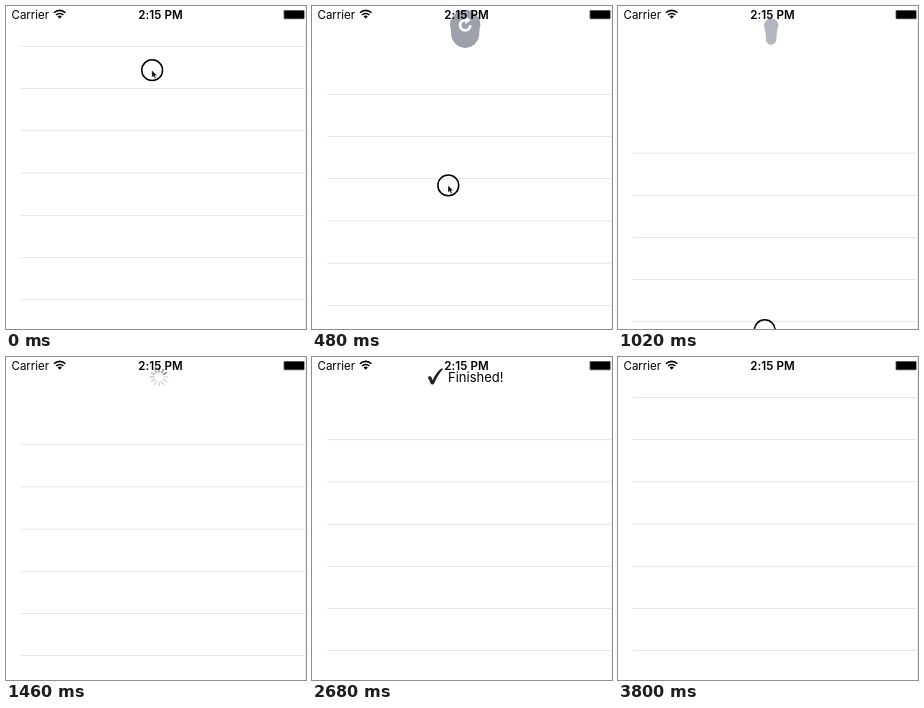
These frames come from a looping animation (300x323 px, 4140 ms). An HTML page:

```html
<!DOCTYPE html>
<html lang="en">
<head>
<meta charset="utf-8">
<title>Pull to refresh</title>
<style>
  html, body { margin: 0; width: 100%; height: 100%; overflow: hidden; background: #fff; }
  svg { display: block; width: 300px; height: 323px; }
  text { font-family: Inter, Roboto, sans-serif; }
</style>
</head>
<body>
<svg viewBox="0 0 300 323">
  <rect width="300" height="323" fill="#fff"/>
  <rect x="299" width="1" height="323" fill="#efefef"/>
  <g id="rows" fill="#c8c7cc"></g>
  <g id="spinner" stroke="#7c7c7c" stroke-width="1.6" stroke-linecap="round"></g>
  <g id="done">
    <path fill="#222" d="M115.7 20.6C117 18.7 119 18.8 119.6 20.6L120.6 23.3C122.6 18.6 125.6 14.3 128.6 12C129.8 11.3 131.2 11.6 130.9 12.3C127.3 16.2 124.4 21 122.4 26C121.7 27.8 119.4 28 118.6 26.4C117.7 24.4 117 22.3 115.7 20.6Z"/>
    <text x="136" y="24.6" font-size="13">Finished!</text>
  </g>
  <g id="drop">
    <path id="body" fill="#9ba2ac" stroke="#808791" stroke-width=".6"/>
    <path id="arrow" fill="#fff"/>
  </g>
  <g id="status">
    <text x="5.5" y="13.2" font-size="11.5">Carrier</text>
    <text x="154.5" y="13.2" font-size="11.6" font-weight="600" letter-spacing=".1" text-anchor="middle">2:15 PM</text>
    <g fill="none" stroke="#000" stroke-width="1.6">
      <path d="M48 6.8A8 8 0 0 1 59.4 6.8"/>
      <path d="M50.1 9A5 5 0 0 1 57.3 9"/>
    </g>
    <path d="M51.6 10.6A3 3 0 0 1 55.8 10.6L53.7 12.7Z"/>
    <rect x="277.5" y="4" width="21.2" height="9.2" rx="1.2" fill="#777"/>
    <rect x="278.3" y="4.8" width="19.7" height="7.7" rx=".6"/>
  </g>
  <g id="cursor">
    <circle r="10.4" fill="none" stroke="#000" stroke-width="1.5"/>
    <path d="M-.3 0V7.2L1.4 5.7L2.6 8.3L3.9 7.7L2.7 5.2H4.9Z" stroke="#fff" stroke-width=".4"/>
  </g>
</svg>
<script>
const LOOP = 4140, TRIGGER = 864, RELEASE = 1100, DONE = 2680, CLOSE = 3360, CLOSED = 3780;
const PT = 0.958, MID = 153.2, TOP = -1, OPEN = 42.35, ROW = 42.18, FIRST = 40.25;
const $ = id => document.getElementById(id);
const lerp = (a, b, p) => a + (b - a) * p;
const clamp = v => Math.min(1, Math.max(0, v));
const show = (el, on) => el.setAttribute('visibility', on ? 'visible' : 'hidden');
const move = (el, x, y, extra = '') => el.setAttribute('transform', `translate(${x} ${y})${extra}`);

function add(parent, name, attrs) {
  const el = document.createElementNS('http://www.w3.org/2000/svg', name);
  for (const key in attrs) el.setAttribute(key, attrs[key]);
  parent.append(el);
  return el;
}

for (let i = 0; i < 7; i++)
  add($('rows'), 'rect', { x: 15, y: FIRST + i * ROW, width: 284, height: 0.45 });

const spokes = Array.from({ length: 12 }, (_, i) =>
  add($('spinner'), 'line', { y1: -5, y2: -8.8, transform: `rotate(${i * 30})` }));

// time, x, y of the finger
const drag = [[0, 146.2, 64], [280, 136.7, 122.5], [660, 138.2, 231.5], [1020, 146.7, 324], [1100, 147.7, 341]];

function finger(t, axis) {
  const last = drag.length - 1;
  let i = 0;
  while (i < last - 1 && t > drag[i + 1][0]) i++;
  const slope = n => {
    const a = drag[Math.max(0, n - 1)], b = drag[Math.min(last, n + 1)];
    return (b[axis] - a[axis]) / (b[0] - a[0]);
  };
  const a = drag[i], b = drag[i + 1], span = b[0] - a[0], p = clamp((t - a[0]) / span);
  const q = 1 - p;
  return a[axis] * q * q * (1 + 2 * p) + b[axis] * p * p * (3 - 2 * p)
    + span * p * q * (slope(i) * q - slope(i + 1) * p);
}

// rubber band resistance
function pulled(t) {
  const x = Math.max(0, finger(t, 2) - 84), d = 552;
  return d * (1 - 1 / (x * 0.55 / d + 1));
}

function offset(t) {
  if (t < RELEASE) return pulled(t);
  if (t < CLOSE) {
    const k = 0.012 * (t - RELEASE);
    return OPEN + (pulled(RELEASE) - OPEN) * Math.exp(-k) * (1 + k);
  }
  const p = clamp((t - CLOSE) / (CLOSED - CLOSE));
  return OPEN * (1 - p * p * (3 - 2 * p));
}

function dropShape(off) {
  const dist = Math.min(53, Math.max(0, off / PT - 43)), full = 1 - dist / 53;
  const size = (min, max) => PT * lerp(min, max, full);
  const topR = size(12.5, 16), botR = size(3, 16);
  const botY = TOP + off - size(4, 6) - botR;
  const topY = dist ? TOP + size(9, 5) + topR : botY;
  return { topR, botR, topY, botY, ring: size(5, 7), tip: size(2, 3) };
}

function bodyPath({ topR, botR, topY, botY }) {
  const cy = lerp(topY, botY, 0.2), near = lerp(topR, botR, 0.1), far = lerp(topR, botR, 0.9);
  return `M${MID - topR} ${topY}A${topR} ${topR} 0 0 1 ${MID + topR} ${topY}`
    + `C${MID + near} ${cy} ${MID + far} ${cy} ${MID + botR} ${botY}`
    + `A${botR} ${botR} 0 0 1 ${MID - botR} ${botY}`
    + `C${MID - far} ${cy} ${MID - near} ${cy} ${MID - topR} ${topY}Z`;
}

function arrowPath({ topY: y, ring: r, tip: s }) {
  const inner = r - s;
  return `M${MID + r} ${y}A${r} ${r} 0 1 1 ${MID} ${y - r}V${y - r - s}`
    + `L${MID + 2 * s} ${y - r + s / 2}L${MID} ${y - r + 2 * s}V${y - inner}`
    + `A${inner} ${inner} 0 1 0 ${MID + inner} ${y}Z`;
}

function drawDrop(t) {
  const p = clamp((t - TRIGGER) / 200);
  show($('drop'), p < 1);
  if (p === 1) return;
  const shape = dropShape(pulled(Math.min(t, TRIGGER)));
  $('arrow').setAttribute('d', arrowPath(shape));
  $('arrow').setAttribute('opacity', clamp(1 - p * 2));
  const end = 5.6 * PT, centre = TOP + 21.5 * PT;
  shape.topR = lerp(shape.topR, end, p);
  shape.botR = lerp(shape.botR, end, p);
  shape.topY = lerp(shape.topY, centre, p);
  shape.botY = lerp(shape.botY, centre, p);
  $('body').setAttribute('d', bodyPath(shape));
  $('drop').setAttribute('opacity', 1 - p ** 6);
}

function drawSpinner(t) {
  const grow = clamp((t - TRIGGER - 150) / 200);
  show($('spinner'), grow > 0 && t < DONE);
  move($('spinner'), MID - 0.2, 20, ` scale(${lerp(0.1, 1, grow)})`);
  $('spinner').setAttribute('opacity', grow);
  const head = Math.floor((t - 2077) / (1000 / 12)) + 10 + 24;
  spokes.forEach((el, i) => {
    const age = (head - i + 24) % 12;
    el.setAttribute('opacity', Math.max(0.27, 0.85 - age * 0.085));
  });
}

function draw(t) {
  const off = offset(t);
  move($('rows'), 0, off);
  drawDrop(t);
  drawSpinner(t);
  show($('done'), t >= DONE && t < CLOSED);
  move($('done'), 0, Math.min(0, off - OPEN));
  show($('cursor'), t < RELEASE);
  move($('cursor'), finger(t, 1), finger(t, 2));
}

const start = performance.now();
function tick() {
  draw((performance.now() - start) % LOOP);
  requestAnimationFrame(tick);
}
tick();
</script>
</body>
</html>
```
